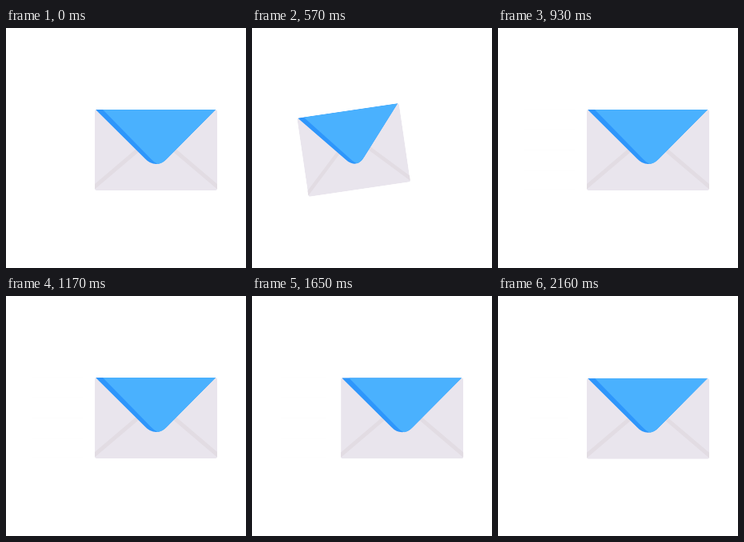
These frames come from a looping animation (300x300 px, 2.19 s). An HTML page:

```html
<!DOCTYPE html>
<html lang="en">
<head>
<meta charset="utf-8">
<title>Envelope</title>
<style>
  html, body { margin: 0; width: 100%; height: 100%; overflow: hidden; background: #fff; }
  svg { display: block; width: 100%; height: 100%; }
</style>
</head>
<body>
<svg viewBox="0 0 300 300">
  <path id="trail" stroke="#fdfdfd" fill="none"/>
  <g id="mail">
    <clipPath id="edge"><rect x="111" y="102" width="153" height="101" rx="2.5"/></clipPath>
    <g clip-path="url(#edge)">
      <rect x="111" y="102" width="153" height="101" fill="#e9e5ed"/>
      <path d="M109 200L169 149M266 200L206 149" stroke="#e2dce3" stroke-width="5"/>
      <path d="M112 102H262L201 163.500Q195 170 187.500 170T174 163.500Z" fill="#2e96fb"/>
      <path d="M121 102H262L201 163.500Q196 169 190 170Q186 168.500 181 163.500Z" fill="#4ab1fe"/>
    </g>
  </g>
</svg>
<script>
  const LOOP = 2190, CX = 187.5, CY = 152.5;
  const mail = document.getElementById('mail');
  const trail = document.getElementById('trail');

  // Cubic ease in and out, from 0 at time a to 1 at time b
  function ease(t, a, b) {
    const u = Math.min(1, Math.max(0, (t - a) / (b - a)));
    return u < 0.5 ? 4 * u ** 3 : 1 - 4 * (1 - u) ** 3;
  }

  function draw(t) {
    const pull = ease(t, 0, 250) - ease(t, 380, 930);
    const driftX = 0.5 * (ease(t, 1100, 1400) - ease(t, 1420, 1800));
    const driftY = 0.8 * ease(t, 1420, 1900);
    mail.setAttribute('transform',
      `translate(${CX - 72.5 * pull + driftX} ${CY + driftY}) rotate(${-10 * pull}) ` +
      `scale(${1 - 0.19 * pull} ${1 - 0.02 * pull}) translate(${-CX} ${-CY})`);

    // Barely visible speed lines behind the resting envelope
    const half = 32 * ease(t, 750, 930) - 16 * ease(t, 1500, 1900) + 8 * ease(t, 1920, 2160);
    trail.setAttribute('d', half < 1 ? '' : [102, 127, 152.5, 178, 202]
      .map(y => `M${64 - half} ${y}H${64 + half}`).join(''));
  }

  function tick() {
    draw(performance.now() % LOOP);
    requestAnimationFrame(tick);
  }
  tick();
</script>
</body>
</html>
```
